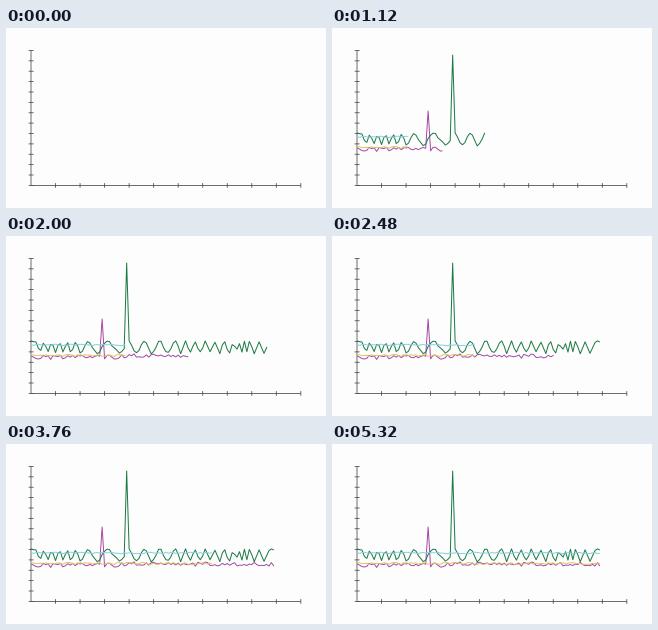
Write a matplotlib script that moves like this. It is 320 by 180 pixels and loops after 6000 ms.

```python
import numpy as np
import matplotlib.pyplot as plt
from matplotlib.animation import FuncAnimation

W, H, DPI = 320, 180, 100
FRAMES, INTERVAL = 150, 40
X0, Y0 = 25.0, 157.4          # axis corner
X_TICK, Y_TICK = 24.53, 10.38
STEP = X_TICK / 10            # ten samples per tick
N = 100
START = 1.9                   # frames before the lines appear
INK = "#4a4a4a"


def px(width):
    return width * 72 / DPI


fig = plt.figure(figsize=(W / DPI, H / DPI), dpi=DPI, facecolor="#fdfdfd")
ax = fig.add_axes([0, 0, 1, 1])
ax.set_xlim(0, W)
ax.set_ylim(H, 0)
ax.axis("off")


def segment(x1, y1, x2, y2):
    ax.plot([x1, x2], [y1, y2], color=INK, lw=px(0.8), snap=False,
            solid_capstyle="butt", zorder=1)


segment(X0, Y0 - 13 * Y_TICK, X0, Y0)
segment(X0, Y0, X0 + 11 * X_TICK, Y0)
for i in range(14):
    y = Y0 - i * Y_TICK
    segment(X0 - 2.3, y, X0 + 2.6, y)
for i in range(1, 12):
    x = X0 + i * X_TICK
    segment(x, Y0 - 2.3, x, Y0 + 2.4)

idx = np.arange(N)
xs = X0 + STEP * idx
rng = np.random.default_rng(11)


def noisy(level, spread):
    return level + rng.uniform(-spread, spread, N)


# The green line oscillates at a varying rate: (sample, cycles so far).
beats = [(2, 0), (18, 5), (23, 6), (31, 7), (36.5, 7.5), (46, 9),
         (59, 11), (63, 12), (75, 15), (82.5, 17), (89, 20), (97, 22)]
cycles = np.interp(idx, *zip(*beats))
green = noisy(111.3 - 5.6 * np.cos(2 * np.pi * cycles), 1.2)
green[39] = 27

purple = noisy(np.interp(idx, [0, 35, 42, N], [121.3, 121, 119.8, 120.4]), 2.2)
purple[29] = 83

orange = noisy(119.5, 1)
blue = noisy(109, 0.8)

# values, colour, width in pixels, drawing time in frames
series = [
    (purple, "#a0449f", 0.95, 75),
    (orange, "#dfc160", 0.95, 125),
    (green, "#1d7a42", 1.0, 50),
    (blue, "#85cfe8", 1.0, 125),
]
lines = [ax.plot([], [], color=color, lw=px(width), solid_capstyle="butt",
                 solid_joinstyle="round", zorder=2 + i)[0]
         for i, (_, color, width, _) in enumerate(series)]


def reveal(line, ys, tip):
    """Show the curve from the left up to a fractional sample index."""
    if tip <= 0:
        line.set_data([], [])
        return
    tip = min(tip, N - 1)
    n = int(tip) + 1
    x = X0 + STEP * tip
    line.set_data(np.append(xs[:n], x),
                  np.append(ys[:n], np.interp(x, xs, ys)))


def draw(frame):
    for line, (ys, _, _, span) in zip(lines, series):
        reveal(line, ys, (frame - START) * N / span)
    return lines


anim = FuncAnimation(fig, draw, frames=FRAMES, interval=INTERVAL,
                     repeat=True, repeat_delay=0, blit=False)
plt.show()
```
